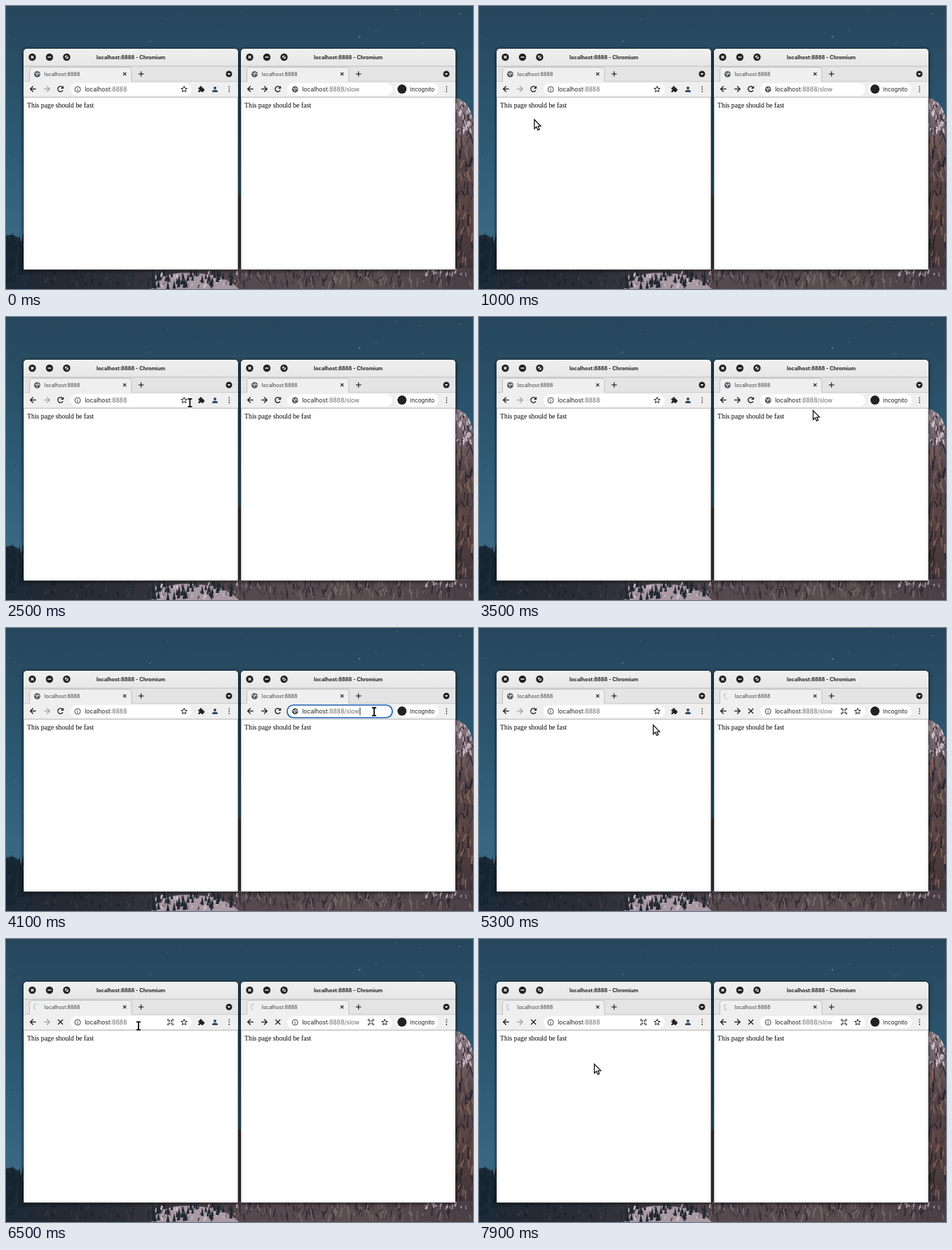
An HTML page with a canvas that plays this animation: 666 px wide and 404 px high, repeating every 8000 ms.

```html
<!DOCTYPE html>
<html lang="en">
<head>
<meta charset="utf-8">
<title>Two browser windows</title>
<style>
  html, body { margin: 0; width: 100%; height: 100%; overflow: hidden; background: #2c5069; }
  canvas { display: block; }
</style>
</head>
<body>
<canvas id="stage" width="666" height="404"></canvas>
<script>
const stage = document.getElementById('stage');
const LOOP = 8000, TURN = 2 * Math.PI, DARK = '#222', GREY = '#6c6c6c';
let ctx = stage.getContext('2d');

// Drawing helpers
function line(x0, y0, x1, y1, color = DARK, width = 1.2) {
  ctx.beginPath();
  ctx.moveTo(x0, y0);
  ctx.lineTo(x1, y1);
  ctx.strokeStyle = color;
  ctx.lineWidth = width;
  ctx.stroke();
}
function shape(path, x, y, fill, stroke, width = 1) {
  const outline = new Path2D(path);
  ctx.save();
  ctx.translate(x, y);
  if (fill) { ctx.fillStyle = fill; ctx.fill(outline); }
  if (stroke) { ctx.strokeStyle = stroke; ctx.lineWidth = width; ctx.stroke(outline); }
  ctx.restore();
}
function arc(x, y, r, from, to, color = DARK, width = 1) {
  ctx.beginPath();
  ctx.arc(x, y, r, from, to);
  ctx.strokeStyle = color;
  ctx.lineWidth = width;
  ctx.stroke();
}
function disc(x, y, r, color = DARK) {
  ctx.beginPath();
  ctx.arc(x, y, r, 0, TURN);
  ctx.fillStyle = color;
  ctx.fill();
}
function rect(x, y, w, h, color = DARK) {
  ctx.fillStyle = color;
  ctx.fillRect(x, y, w, h);
}
function box(x, y, w, h, radius, fill, stroke, width = 1) {
  ctx.beginPath();
  ctx.roundRect(x, y, w, h, radius);
  if (fill) { ctx.fillStyle = fill; ctx.fill(); }
  if (stroke) { ctx.strokeStyle = stroke; ctx.lineWidth = width; ctx.stroke(); }
}
function text(string, x, y, font, color = DARK, align = 'left') {
  ctx.font = font;
  ctx.fillStyle = color;
  ctx.textAlign = align;
  ctx.fillText(string, x, y);
  return ctx.measureText(string).width;
}
function cross(x, y, r, color = DARK, width = 1.2) {
  line(x - r, y - r, x + r, y + r, color, width);
  line(x + r, y - r, x - r, y + r, color, width);
}
function gradient(x0, y0, x1, y1, ...colors) {
  const fill = ctx.createLinearGradient(x0, y0, x1, y1);
  colors.forEach((c, i) => fill.addColorStop(i / (colors.length - 1), c));
  return fill;
}
let seed = 77;
function random(from = 0, to = 1) {
  seed = seed * 16807 % 2147483647;
  return from + (to - from) * seed / 2147483647;
}

// Icons
function globe(x, y) {
  disc(x, y, 4.4, '#505458');
  shape('M-3-1.6L-.5-.2L-.2 2.6M.6-3L1-1L3.4-.2', x, y, null, '#eee', 1.2);
}
function info(x, y) {
  arc(x, y, 4, 0, TURN, '#444');
  rect(x - .5, y - 2.2, 1, 1, '#444');
  rect(x - .5, y - .5, 1, 2.8, '#444');
}
function arrow(x, y, dir, color) {
  line(x - 4 * dir, y, x + 4 * dir, y, color, 1.4);
  shape(`M0-4L${4 * dir} 0L0 4`, x, y, null, color, 1.4);
}
function reload(x, y) {
  arc(x, y, 3.8, .5, 5.5, DARK, 1.4);
  shape('M4.5-4.6V-.4H.3Z', x, y, DARK);
}
function star(x, y) {
  ctx.beginPath();
  for (let i = 0; i < 10; i++) {
    const r = i % 2 ? 2 : 4.5, a = (i / 10 - .25) * TURN;
    ctx.lineTo(x + r * Math.cos(a), y + r * Math.sin(a));
  }
  ctx.closePath();
  ctx.strokeStyle = DARK;
  ctx.lineWidth = 1;
  ctx.stroke();
}
function tiles(x, y) {
  for (const sx of [-1, 1]) for (const sy of [-1, 1]) {
    rect(x + sx * 1.8 - 1.1, y + sy * 1.8 - 1.1, 2.2, 2.2, '#444');
    shape(`M${sx * 4} ${sy * 2}V${sy * 4}H${sx * 2}`, x, y, null, DARK, .9);
  }
}
function puzzle(x, y) {
  rect(x - 4, y - 2.5, 7, 6.5);
  disc(x - .5, y - 3, 1.7);
  disc(x + 3.2, y + .8, 1.7);
  disc(x - 4, y + .8, 1.3, '#eee');
  disc(x - .5, y + 4, 1.3, '#eee');
}
function person(x, y) {
  disc(x, y - 2, 2, '#2d4968');
  box(x - 4, y + .8, 8, 3.2, [3, 3, 0, 0], '#2d4968');
}
function spinner(x, y, t) {
  const middle = 2.9 - t / 1320 * TURN;
  arc(x, y, 4.2, middle - 1.3, middle + 1.3, '#a3b4dc', 1.1);
}

// Fills an area with random rock streaks
function streaks(count, x, y, w, h, length, ...colors) {
  for (let i = 0; i < count; i++) {
    const x0 = x + random(0, w), y0 = y + random(0, h);
    line(x0, y0, x0 + random(-.3, .3) * length, y0 + random(.3, 1) * length,
      colors[i % colors.length], random(.8, 2.6));
  }
}
function pines(count, x, y, w, h, size, color) {
  for (let i = 0; i < count; i++) {
    const s = size * random(.6, 1);
    shape(`M0 0L${s / 5} ${s}H${-s / 5}Z`, x + random(0, w), y + random(0, h), color);
  }
}

function drawBackground() {
  rect(0, 0, 666, 404, gradient(0, 0, 0, 404, '#26465b', '#2d5a75', '#42708c'));
  for (let i = 0; i < 90; i++) {
    const x = random(0, 666), y = random(0, 300), size = random(.4, 1.2);
    line(x - size, y + size * .7, x + size, y - size * .7, `rgba(225, 238, 245, ${random(.1, .8) ** 2})`, size);
  }

  // Cliff: brown wall under a snowy crest
  rect(331, 272, 4, 110, '#493b40');
  shape('M0 131Q20 136 25 163V404H0Z', 641, 0, gradient(0, 131, 0, 380, '#8b7b84', '#55464b', '#5a4442', '#3c3238'));
  ctx.save();
  ctx.clip(new Path2D('M641 131Q661 136 666 163V404H641Z'));
  streaks(70, 641, 128, 26, 50, 9, '#cbbcc4', '#42363e', '#d5c7cd');
  streaks(100, 641, 180, 26, 190, 18, '#2b252d', '#806358', '#473a40');
  ctx.restore();

  // Valley: dark forest, snow field, then rock
  rect(0, 374, 666, 30, gradient(0, 0, 666, 0, '#1d2833', '#2b2e37', '#55494e', '#5a4e50', '#4a3f44'));
  streaks(70, 0, 374, 215, 22, 8, '#17212c', '#3d3c45', '#28303a');
  shape('M0 28Q12 2 60 5T125 28Z', 207, 376, '#a899a3');
  streaks(45, 210, 378, 120, 20, 7, '#d0c2c9', '#4b464f');
  pines(55, 200, 374, 130, 18, 13, '#222831');
  streaks(190, 325, 372, 341, 22, 14, '#332c33', '#75666a', '#443a40');
  streaks(35, 590, 374, 76, 8, 8, '#b3a3aa', '#4b4147');
  shape('M0 328Q18 322 25 345V404H0Z', 0, 0, '#1c2b37');
  pines(35, 0, 322, 27, 60, 20, '#172531');
}

function drawWindowFrame(x) {
  ctx.save();
  ctx.shadowColor = '#000b';
  ctx.shadowBlur = 5;
  ctx.shadowOffsetY = 1;
  box(x, 61, 306, 315.5, [5, 5, 1, 1], '#fff', '#0007', .8);
  ctx.restore();
  box(x, 61, 306, 26, [5, 5, 0, 0], gradient(0, 61, 0, 86, '#f0f0f0', '#e6e6e6'));
  rect(x, 86, 306, 22, '#e4e4e4');
  rect(x, 108, 306, 22, '#efefef');
  rect(x, 85.5, 306, 1, '#bdbdbd');
  rect(x, 107.3, 306, .8, '#c4c4c4');
  rect(x, 129.7, 306, 1, '#b4b4b4');
  box(x + 8.5, 87.5, 145.5, 22, [4, 4, 0, 0], '#efefef', '#bcbcbc', .9);
  rect(x + 6, 108, 150, 4, '#efefef');

  for (let i = 0; i < 3; i++) disc(x + 12.5 + 24.5 * i, 73, 5.2);
  cross(x + 12.5, 73, 1.8, '#fff', 1.3);
  line(x + 34.5, 73, x + 39.5, 73, '#fff', 1.4);
  rect(x + 59.3, 70.8, 4.4, 4.4, '#fff');
  line(x + 59, 75.5, x + 64, 70.5, DARK, 1.3);
  text('localhost:8888 - Chromium', x + 153.2, 75.7, '700 7.3px Inter, sans-serif', DARK, 'center');

  text('localhost:8888', x + 29.8, 99.6, '7.2px Inter, sans-serif', '#3a3a3a');
  cross(x + 144.3, 97, 2.1);
  line(x + 164, 97, x + 171.5, 97);
  line(x + 167.7, 93.3, x + 167.7, 100.7);
  disc(x + 293, 97, 4.5);
  shape('M-2.3-1H2.3L0 1.8Z', x + 293, 97, '#fff');
  for (const dy of [-3.3, 0, 3.3]) disc(x + 293.3, 118.6 + dy, .85);
  text('This page should be fast', x + 5, 144.8, '9.8px "Liberation Serif", serif', '#000');
}

const windows = [
  { x: 25, barX: 92, barWidth: 173, path: ':8888', click: 5900, enter: 6300 },
  { x: 335, barX: 401, barWidth: 150, path: ':8888/slow', click: 4000, enter: 4500, incognito: true }
];

function drawWindowState({ x, barX, barWidth, path, click, enter, incognito }, t) {
  const loading = t >= enter, focused = t >= click && !loading;
  const starX = barX + barWidth - 11, iconX = x + 77.2, urlX = x + 87.2;

  if (loading) spinner(x + 19, 97, t);
  else globe(x + 19.5, 97.3);

  arrow(x + 13.7, 118.5, -1, DARK);
  arrow(x + 33.2, 118.5, 1, incognito ? DARK : '#a5a5a5');
  if (loading) cross(x + 52.7, 118.5, 3.5, DARK, 1.3);
  else reload(x + 52.7, 118.5);

  box(barX, 110, barWidth, 18, 9, '#fff', focused && '#1c62b5', 1.7);
  if (incognito && !loading) globe(iconX, 119);
  else info(iconX, 119);

  const font = '8.57px Inter, sans-serif';
  const hostWidth = text('localhost', urlX, 122.2, font);
  const pathWidth = text(path, urlX + hostWidth, 122.2, font, GREY);
  if (focused) rect(urlX + hostWidth + pathWidth + .3, 113.5, 1, 11);
  if (loading) tiles(starX - 19.5, 118.7);
  if (loading || !incognito) star(starX, 119);

  if (incognito) {
    box(x + 220, 110, 62, 17.5, 9, '#fff');
    disc(x + 229.7, 118.6, 6.5);
    text('Incognito', x + 241, 121.6, '8px Inter, sans-serif');
  } else {
    puzzle(x + 253.3, 119);
    person(x + 273, 119);
  }
}

// The pointer glides to each stop and arrives there at the given time
const stops = [
  { at: 500, x: 60, y: 190 },
  { at: 1700, x: 109, y: 115 },
  { at: 3500, x: 476, y: 133 },
  { at: 3900, x: 525, y: 119.5, rest: 800 },
  { at: 5300, x: 248, y: 138 },
  { at: 5800, x: 189, y: 124, rest: 800 },
  { at: 7300, x: 164, y: 178 }
];
function pointerAt(t) {
  const from = stops.findLast(stop => stop.at <= t);
  if (!from) return null;
  const to = stops[stops.indexOf(from) + 1] || from;
  const leave = from.at + (from.rest || 0);
  const k = to === from ? 0 : Math.max(0, (t - leave) / (to.at - leave));
  const ease = k * k * (3 - 2 * k);
  return { x: from.x + (to.x - from.x) * ease, y: from.y + (to.y - from.y) * ease };
}
function drawPointer(t) {
  const point = pointerAt(t);
  if (!point) return;
  const { x, y } = point;
  const overUrl = y > 110 && y < 128 &&
    windows.some(w => x > w.x + 87 && x < w.barX + w.barWidth);
  if (overUrl) {
    const beam = 'M0-5.5V5.5M-3-5.7H3M-3 5.7H3';
    shape(beam, x, y, null, '#fff', 3.6);
    shape(beam, x, y, null, '#000', 1.7);
  } else {
    shape('M.5.5V13.5L3.4 10.8L5.5 15.5L7.7 14.5L5.7 10L9.6 9.8Z', x, y, '#fff', '#111', 1.3);
  }
}

// The unchanging scene is painted once
const scene = document.createElement('canvas');
scene.width = stage.width;
scene.height = stage.height;
const screenContext = ctx;
ctx = scene.getContext('2d');
drawBackground();
windows.forEach(w => drawWindowFrame(w.x));
ctx = screenContext;

const begin = performance.now();
function tick() {
  const t = (performance.now() - begin) % LOOP;
  ctx.drawImage(scene, 0, 0);
  windows.forEach(w => drawWindowState(w, t));
  drawPointer(t);
  requestAnimationFrame(tick);
}
tick();
</script>
</body>
</html>
```
